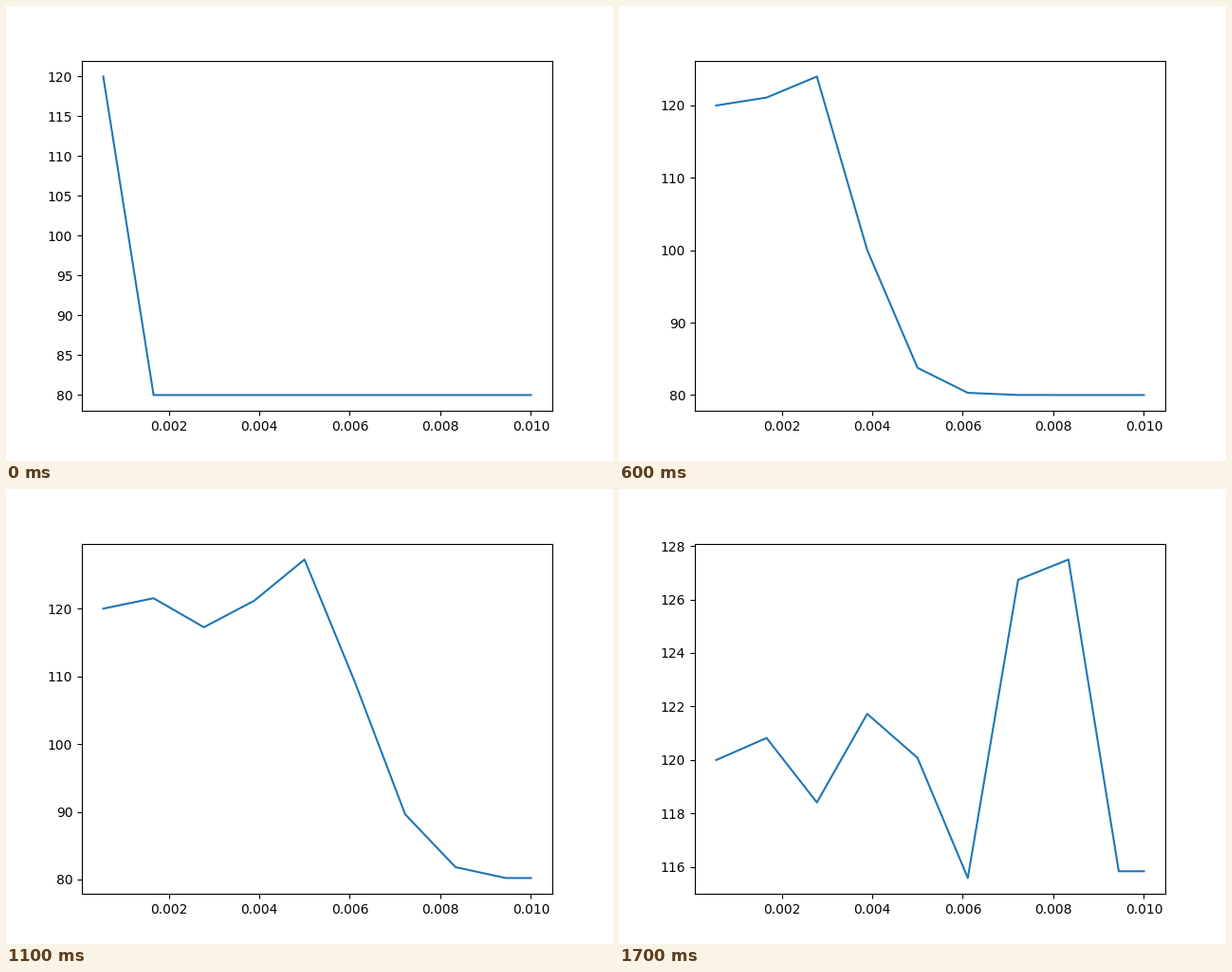
A matplotlib script for the animation above (1800 ms loop, 640 by 480 pixels).

```python
import numpy as np
import matplotlib.pyplot as plt
from matplotlib.animation import FuncAnimation

LENGTH, CELLS, STEPS = 0.01, 9, 18
INLET, REST = 120.0, 80.0
TRAVEL = 0.00055  # distance the wave covers in one step

dx = LENGTH / CELLS
x = np.append((np.arange(CELLS) + 0.5) * dx, LENGTH)
courant2 = (TRAVEL / dx) ** 2


def solve():
    """Wave equation: fixed inlet, zero-gradient outlet, fluid at rest."""
    u = np.full(CELLS + 1, REST)
    u[0] = INLET
    old = u.copy()
    states = [u]
    for _ in range(STEPS - 1):
        new = u.copy()
        new[1:-1] = 2 * u[1:-1] - old[1:-1] + courant2 * np.diff(u, 2)
        new[-1] = new[-2]
        old, u = u, new
        states.append(u)
    return states


states = solve()
fig, ax = plt.subplots(figsize=(6.4, 4.8), dpi=100)


def draw(step):
    ax.clear()
    return ax.plot(x, states[step], color="#1f77b4", lw=1.5)


anim = FuncAnimation(fig, draw, frames=STEPS, interval=100,
                     repeat=True, repeat_delay=0, blit=False)
plt.show()
```
